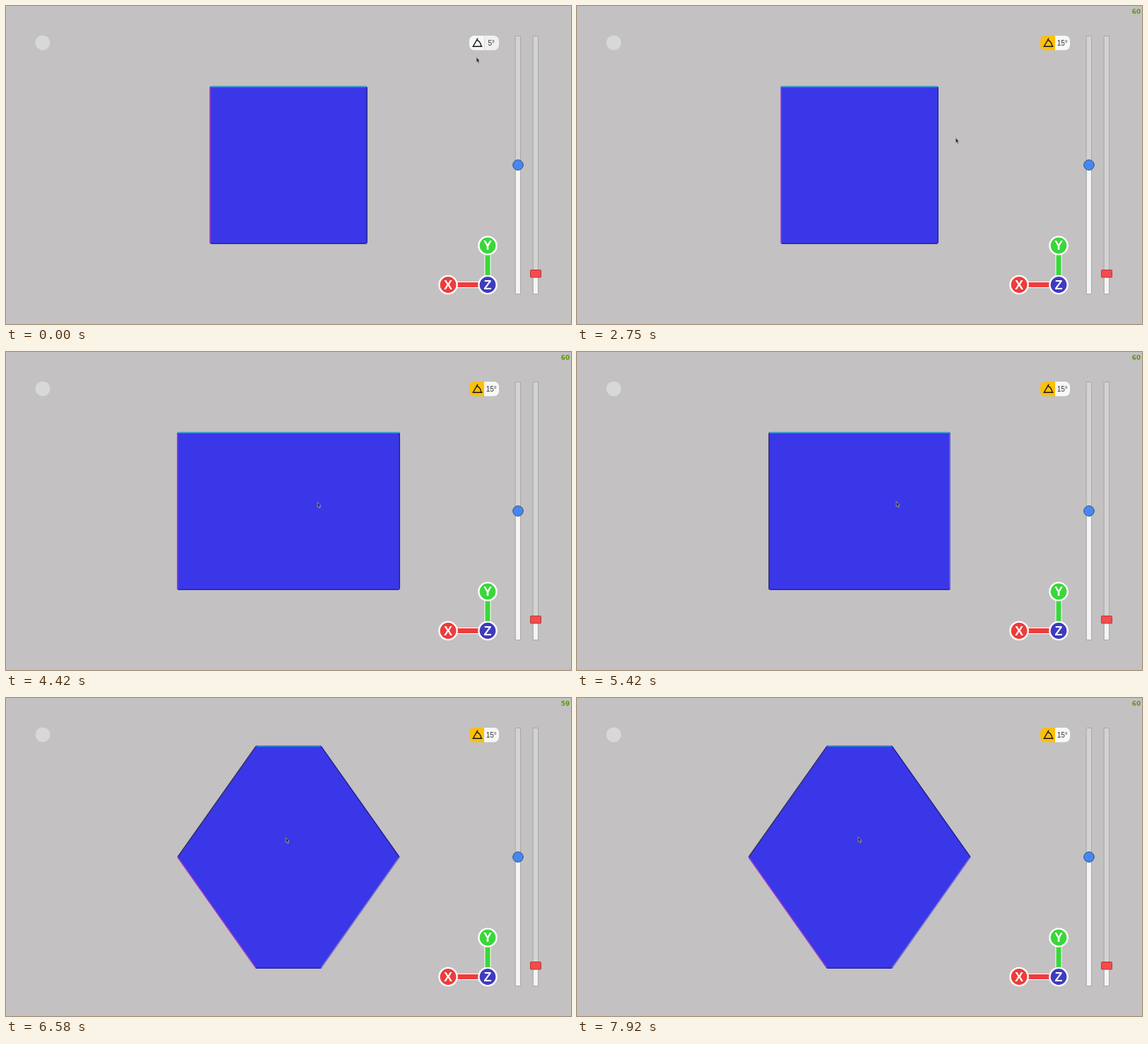
Write an HTML page with a canvas that moves like this. It is 800x450 px and loops after 8000 ms.

```html
<!DOCTYPE html>
<html lang="en">
<head>
<meta charset="utf-8">
<title>Cube section</title>
<style>
  html, body { margin: 0; width: 100%; height: 100%; overflow: hidden; background: #c3c1c2; }
  canvas { display: block; width: 800px; height: 450px; }
</style>
</head>
<body>
<canvas id="stage" width="800" height="450"></canvas>
<script>
const ctx = document.getElementById('stage').getContext('2d');
const LOOP = 8000, FPS = 12, HALF = 111.6, CENTER_X = 400, CENTER_Y = 225.2;

// Pointer tip at a few moments of its walk
const POINTER = [
  { at: 0, x: 666, y: 72 }, { at: 500, x: 668, y: 50 }, { at: 1250, x: 668, y: 50 },
  { at: 2150, x: 686, y: 51 }, { at: 2750, x: 536, y: 186 }, { at: 2833, x: 510, y: 289 },
  { at: 3600, x: 421, y: 232 }, { at: 4083, x: 439, y: 212 }, { at: 5417, x: 452, y: 211 },
  { at: 6583, x: 396, y: 197 }, { at: 7917, x: 398, y: 196 }
];

const ramp = (t, from, to) => Math.min(1, Math.max(0, (t - from) / (to - from)));
const smooth = u => u * u * (3 - 2 * u);
const mix = (a, b, u) => a + (b - a) * u;
const snap = degrees => Math.round(degrees / 15) * 15 * Math.PI / 180;

// Steady drags, snapped to the angle step
const turn = t => snap(80 * ramp(t, 3900, 4900) - 35 * ramp(t, 4900, 5900));
const tilt = t => snap(45 * ramp(t, 6250, 6540) + 14 * (ramp(t, 7200, 7450) - ramp(t, 7450, 7800)));

const snapLabel = t => 5 * (1 + Math.floor(2 * ramp(t, 1400, 2080))) + '°';

// The frame rate is refreshed every 750 ms and dips on every seventh reading
function frameRate(t) {
  const reading = Math.floor(t / 750);
  return reading < 1 ? '' : reading % 7 === 1 ? '59' : '60';
}

function pointerAt(t) {
  const i = POINTER.findIndex(key => key.at > t);
  if (i < 0) return POINTER[POINTER.length - 1];
  const a = POINTER[i - 1], b = POINTER[i], u = smooth(ramp(t, a.at, b.at));
  return { x: mix(a.x, b.x, u), y: mix(a.y, b.y, u) };
}

function shape(path, fill, stroke, width = 1) {
  if (fill) { ctx.fillStyle = fill; ctx.fill(path); }
  if (stroke) { ctx.strokeStyle = stroke; ctx.lineWidth = width; ctx.stroke(path); }
}

function rect(x, y, w, h, fill, stroke, radius = 0) {
  const path = new Path2D();
  path.roundRect(x, y, w, h, radius);
  shape(path, fill, stroke);
}

function disc(x, y, r, fill, stroke) {
  const path = new Path2D();
  path.arc(x, y, r, 0, 2 * Math.PI);
  shape(path, fill, stroke);
}

function label(text, x, y, font, color) {
  ctx.font = font;
  ctx.fillStyle = color;
  ctx.textAlign = 'center';
  ctx.fillText(text, x, y);
}

// Projected normals of the turned cube, one pair of opposite faces per axis
function faces(theta, phi) {
  const c = Math.cos(theta), s = Math.sin(theta), sp = Math.sin(phi);
  const axes = [
    { a: c, b: s * sp, front: '#25258f', back: '#a936c6' },
    { a: 0, b: Math.cos(phi), front: '#35a5cc', back: '#21219a' },
    { a: s, b: -c * sp, front: '#8582bc', back: '#34345a' }
  ];
  return axes.flatMap(({ a, b, front, back }) => [{ a, b, color: front }, { a: -a, b: -b, color: back }]);
}

// Clips a large square by every face plane; each vertex keeps the colour of the edge it starts
function section(planes, inset) {
  let poly = [{ x: -400, y: -400 }, { x: 400, y: -400 }, { x: 400, y: 400 }, { x: -400, y: 400 }];
  for (const { a, b, color } of planes) {
    const limit = HALF - inset * Math.hypot(a, b);
    const room = p => limit - a * p.x - b * p.y;
    poly = poly.flatMap((p, i) => {
      const q = poly[(i + 1) % poly.length], dp = room(p), dq = room(q);
      const kept = dp >= 0 ? [p] : [];
      if ((dp >= 0) !== (dq >= 0)) {
        const u = dp / (dp - dq);
        kept.push({ x: mix(p.x, q.x, u), y: mix(p.y, q.y, u), color: dp >= 0 ? color : p.color });
      }
      return kept;
    });
  }
  return poly.map(({ x, y, color }) => ({ x: CENTER_X + x, y: CENTER_Y - y, color }));
}

function drawSection(t) {
  const planes = faces(turn(t), tilt(t));
  const body = new Path2D();
  section(planes, 2).forEach(({ x, y }) => body.lineTo(x, y));
  body.closePath();
  ctx.lineJoin = ctx.lineCap = 'round';
  shape(body, '#3a37e9', '#3a37e9', 4);

  const rim = section(planes, 0.7);
  rim.forEach((p, i) => {
    const q = rim[(i + 1) % rim.length];
    const length = Math.hypot(q.x - p.x, q.y - p.y);
    if (length < 3) return;
    const trim = 1.5 / length;
    const edge = new Path2D();
    edge.moveTo(mix(p.x, q.x, trim), mix(p.y, q.y, trim));
    edge.lineTo(mix(q.x, p.x, trim), mix(q.y, p.y, trim));
    shape(edge, null, p.color, 1.4);
  });
}

function drawSlider(x, level) {
  rect(x - 3.5, 42.5, 7, 365, '#d4d3d4', '#a9a8a9');
  rect(x - 3, level, 6, 407 - level, '#f5f4f5');
}

function drawKnob(name, x, y, color) {
  disc(x, y, 13.8, '#fff');
  disc(x, y, 11.4, color);
  label(name, x, y + 6.4, 'bold 18px "Liberation Sans", sans-serif', '#fff');
}

function drawGizmo() {
  const red = '#ed3c3c', green = '#3bd63b';
  rect(636, 390, 36, 9, '#fff');
  rect(636, 391, 36, 7, red);
  rect(677.5, 350, 9, 34, '#fff');
  rect(678.5, 350, 7, 34, green);
  drawKnob('X', 626, 394.5, red);
  drawKnob('Y', 682, 339, green);
  drawKnob('Z', 682, 394.5, '#3f3bbd');
}

function drawButton(t) {
  const on = ramp(t, 1080, 1250);
  const tint = `rgb(${mix(247, 255, on)}, ${mix(247, 191, on)}, ${mix(247, 6, on)})`;
  rect(656, 42, 21, 20.5, tint, null, [7, 0, 0, 7]);
  rect(677, 42, 21, 20.5, on ? '#f8f8f8' : '#f1f0f1', null, [0, 7, 7, 0]);
  if (!on) rect(677, 42, 1, 20.5, '#dedddd');
  ctx.lineCap = 'butt';
  ctx.lineJoin = 'miter';
  shape(new Path2D('M668 45.6 L661.3 57.2 H674.5 M665.8 48 Q672 49.5 672.9 57'), null, '#181818', 1.4);
  label(snapLabel(t), 687.3, 55.6, '10px "Liberation Sans", sans-serif', '#333');
}

function drawPointer(t) {
  const { x, y } = pointerAt(t);
  ctx.save();
  ctx.translate(Math.round(x) - 0.4, Math.round(y));
  shape(new Path2D('M.5 .5 V7.5 L2 6.2 L3.3 9 L4.6 8.4 L3.4 5.8 H5.4 Z'), '#222', '#b8b6ba', 0.7);
  ctx.restore();
}

function draw(t) {
  ctx.fillStyle = '#c3c1c2';
  ctx.fillRect(0, 0, 800, 450);
  disc(52, 52, 10.5, '#d9d8d9');
  drawSection(t);
  drawSlider(725, 225);
  disc(725, 225, 7.3, '#4787f2', '#33517f');
  drawSlider(750, 379);
  rect(742.5, 373.5, 15, 10.5, '#f54b4d', '#b03a3c', 1);
  drawGizmo();
  drawButton(t);
  label(frameRate(t), 792, 11.2, 'bold 9px "DejaVu Sans", sans-serif', '#5a9a08');
  drawPointer(t);
}

const start = performance.now();
function tick() {
  const t = (performance.now() - start) % LOOP;
  draw(Math.floor((t + 5) * FPS / 1000) * 1000 / FPS % LOOP);
  requestAnimationFrame(tick);
}
tick();
</script>
</body>
</html>
```
